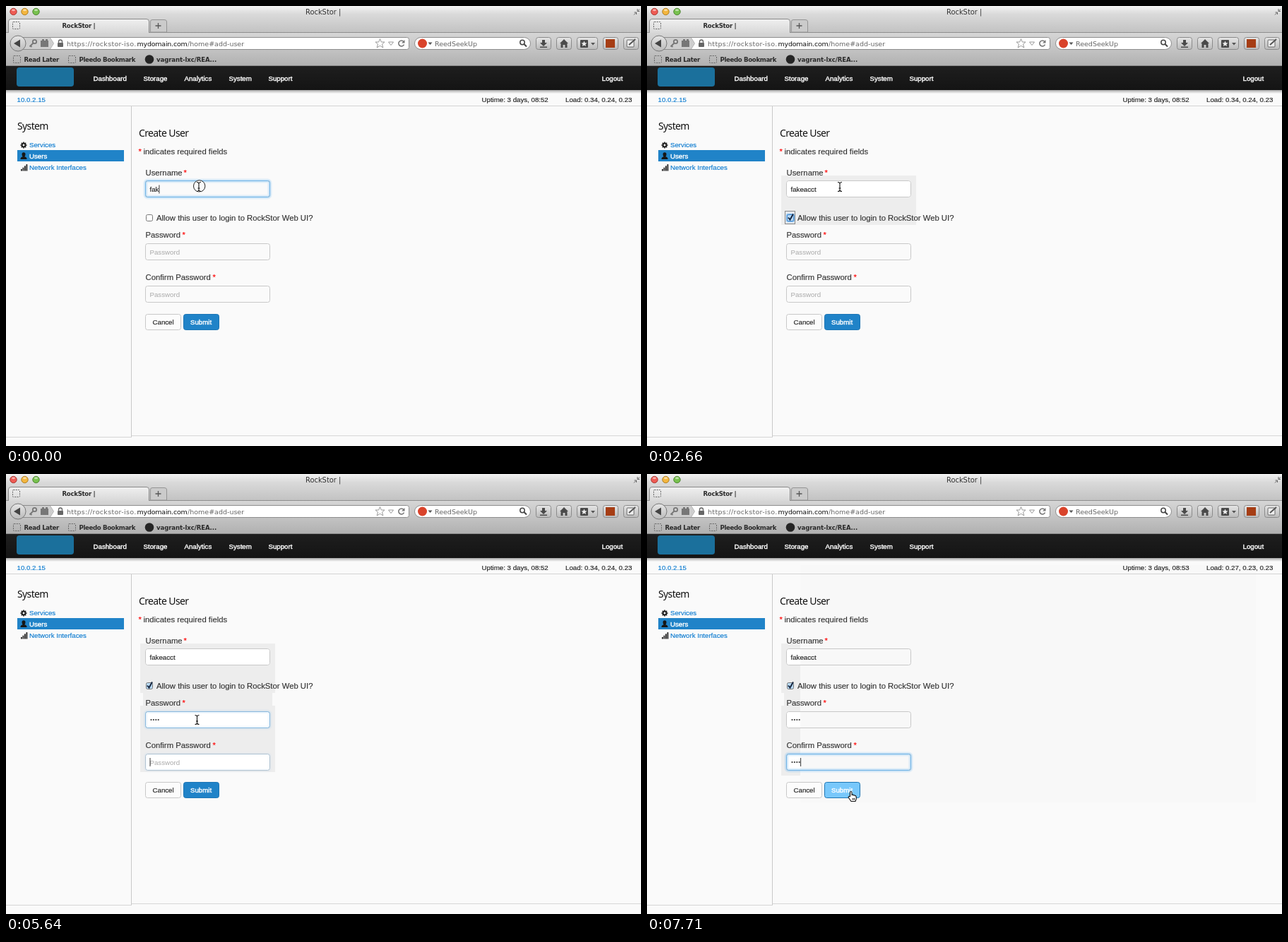
An HTML page for the animation above (8 s loop, 899 px wide and 623 px high).

```html
<!DOCTYPE html>
<html lang="en">
<head>
<meta charset="utf-8">
<title>Create User</title>
<style>
html, body { margin: 0; width: 100%; height: 100%; overflow: hidden; background: #fafafa; }
svg { display: block; width: 899px; height: 623px; }
text { white-space: pre; }
.page { font: 9.7px "Liberation Sans", Arial, sans-serif; fill: #222; stroke: #222; stroke-width: .15px; }
.label { font-size: 11.3px; fill: #333; stroke: #333; }
.head { font: 14px "Noto Sans", sans-serif; letter-spacing: -.63px; fill: #111; }
.strong { fill: #fff; stroke: #fff; stroke-width: .4px; }
.link { fill: #0b7bd0; stroke: #0b7bd0; }
.req { fill: #f00; stroke: #f00; }
.hint { fill: #a9a9a9; stroke: none; }
.ui { font: 9.5px "DejaVu Sans", sans-serif; fill: #333; }
.bold { font-size: 8.6px; font-weight: bold; fill: #2a2a2a; letter-spacing: -.34px; }
</style>
</head>
<body>
<svg viewBox="0 0 899 623" xmlns="http://www.w3.org/2000/svg">
  <defs>
    <linearGradient id="strip" x2="0" y2="1">
      <stop stop-color="#f2f2f2"/><stop offset=".3" stop-color="#dadada"/><stop offset="1" stop-color="#c2c2c2"/>
    </linearGradient>
    <linearGradient id="bar" x2="0" y2="1"><stop stop-color="#d6d6d6"/><stop offset="1" stop-color="#b0b0b0"/></linearGradient>
    <linearGradient id="tab" x2="0" y2="1"><stop stop-color="#f0f0f0"/><stop offset="1" stop-color="#d8d8d8"/></linearGradient>
    <linearGradient id="key" x2="0" y2="1"><stop stop-color="#e6e6e6"/><stop offset="1" stop-color="#bababa"/></linearGradient>
    <linearGradient id="nav" x2="0" y2="1"><stop stop-color="#1e1e1e"/><stop offset="1" stop-color="#141414"/></linearGradient>
    <linearGradient id="shade" x2="0" y2="1"><stop stop-color="#9a9a9a"/><stop offset="1" stop-color="#fafafa"/></linearGradient>
  </defs>
  <rect width="899" height="623" fill="#fafafa"/>
  <g id="chrome"></g>
  <g id="frame"></g>
  <g id="form"></g>
</svg>
<script>
const LOOP = 8000;
const NAME = 'fakeacct';
const $ = id => document.getElementById(id);

const rect = (x, y, w, h, fill, more = '') =>
  `<rect x="${x}" y="${y}" width="${w}" height="${h}" fill="${fill}" ${more}/>`;
const disc = (x, y, r, fill, more = '') => `<circle cx="${x}" cy="${y}" r="${r}" fill="${fill}" ${more}/>`;
const path = (d, fill = 'none', more = '') => `<path d="${d}" fill="${fill}" ${more}/>`;
const line = (d, color, width = 1) => path(d, 'none', `stroke="${color}" stroke-width="${width}"`);
const text = (x, y, str, cls = 'page', more = '') => `<text x="${x}" y="${y}" class="${cls}" ${more}>${str}</text>`;
const box = (x, y, w, h, fill, stroke, r = 3) =>
  rect(x + .5, y + .5, w - 1, h - 1, fill, `rx="${r}" stroke="${stroke}"`);
const dashed = (x, y) =>
  rect(x + .5, y + .5, 10, 10, 'none', 'rx="1" stroke="#666" stroke-dasharray="2 1.3"');

// Value of the last [time, value] step reached.
function at(t, steps) {
  let value = steps[0][1];
  for (const [time, v] of steps) if (t >= time) value = v;
  return value;
}

function chrome() {
  const lights = [['#ee5b54', '#a83a35'], ['#f3b63f', '#ad7d22'], ['#78c14f', '#4b8430']];
  const buttons = [[750, 22], [779, 22], [808, 30], [845, 22], [874, 22]];
  return [
    rect(0, 0, 899, 38, 'url(#strip)'),
    rect(0, 38, 899, 47, 'url(#bar)'),
    lights.map(([fill, edge], i) => disc(10.5 + 16 * i, 8, 4.7, fill, `stroke="${edge}"`) +
      `<ellipse cx="${10.5 + 16 * i}" cy="5.8" rx="2.5" ry="1.4" fill="#fff" opacity=".55"/>`).join(''),
    text(424, 11.5, 'RockStor |', 'ui', 'style="font-size:9.9px"'),
    line('M889 12.500L892 9.500M889.500 9H892.500V12M894 7.500L897 4.500M894 4V7.500H897', '#666'),
    line('M0 37.500H899', '#8e8e8e'),
    path('M3.500 38V22Q3.500 18.500 7 18.500H199Q202.500 18.500 202.500 22V38', 'url(#tab)', 'stroke="#8a8a8a"'),
    path('M204.500 37V22Q204.500 19.500 207 19.500H224Q227.500 19.500 227.500 22V37Z', '#cbcbcb', 'stroke="#949494"'),
    line('M211.500 28H219.500M215.500 24V32', '#555', 1.3),
    dashed(9, 22),
    text(79.5, 31, 'RockStor |', 'ui bold', 'style="letter-spacing:-.3px"'),

    box(18, 44, 553, 18, '#fff', '#8d8d8d', 3),
    path('M22 45H62L67 53L62 61H22Z', '#cecece'),
    line('M62.500 45L67.500 53L62.500 61', '#aaa'),
    disc(17, 53, 11, 'url(#key)', 'stroke="#777"'),
    path('M11 53L20 47.500V58.500Z', '#444'),
    disc(40.5, 50.5, 2.7, 'none', 'stroke="#777" stroke-width="1.8"'),
    line('M38.500 52.500L33.500 57.500M34.500 56L36.500 58', '#777', 1.8),
    path('M49 49H51V47H54V49H56V47H59V49H60V58H49Z', '#777'),
    rect(73, 52, 8, 6, '#666', 'rx="1"'),
    line('M74.500 52V50.500A2.500 2.500 0 0 1 79.500 50.500V52', '#666', 1.4),
    text(86, 56.5, 'https://rockstor-iso.', 'ui', 'style="letter-spacing:.32px;fill:#666"'),
    text(185.5, 56.5, 'mydomain.com', 'ui', 'style="letter-spacing:-.23px;fill:#111"'),
    text(257, 56.5, '/home#add-user', 'ui', 'style="fill:#666"'),
    path('M529.500 46.500L531.400 51H536L532.500 54L533.800 59L529.500 56.200L525.200 59L526.500 54L523 51H527.600Z', '#fff', 'stroke="#999"'),
    path('M541.500 51H548.500L545 55.500Z', '#fff', 'stroke="#999"'),
    line('M563 50.500A4 4 0 1 0 563.500 54.500', '#777', 1.6),
    path('M564.500 48V52.500H560Z', '#777'),

    box(578, 44, 165, 18, '#fff', '#8d8d8d', 9),
    disc(589.5, 53, 6.5, '#d9432b'),
    path('M597.500 51.500H603.500L600.500 55Z', '#555'),
    text(607, 56.5, 'ReedSeekUp', 'ui', 'style="fill:#666"'),
    disc(731, 51.5, 3.2, 'none', 'stroke="#444" stroke-width="1.5"'),
    line('M733.500 54L737 57.500', '#444', 1.9),

    buttons.map(([x, w]) => box(x, 44, w, 18, 'url(#key)', '#8a8a8a')).join(''),
    path('M759 48H763V52H766L761 57L756 52H759ZM756 57.500H766V59H756Z', '#4a4a4a'),
    path('M790 47L796 53H794.500V59H791.500V55H788.500V59H785.500V53H784Z', '#4a4a4a'),
    rect(813, 48, 11, 11, '#4a4a4a', 'rx="1"'),
    path('M818.500 49.500L819.700 52.300H822.500L820.300 54.200L821.100 57L818.500 55.400L815.900 57L816.700 54.200L814.500 52.300H817.300Z', '#eee'),
    path('M828 52H834L831 55.500Z', '#555'),
    rect(849, 47, 13, 12, '#a63d14'),
    rect(879, 48, 10, 10, '#eee', 'rx="1" stroke="#666"'),
    line('M882 55L891 47', '#555', 2),

    dashed(10, 70), dashed(88, 70),
    text(25.5, 78.5, 'Read Later', 'ui bold'),
    text(103.5, 78.5, 'Pleedo Bookmark', 'ui bold'),
    disc(203, 75.5, 6.3, '#252525'),
    text(213, 78.5, 'vagrant-lxc/REA...', 'ui bold', 'style="letter-spacing:-.12px"'),
    line('M0 84.500H899', '#8a8a8a'),
  ].join('');
}

function frame() {
  const menu = [[123.5, 'Dashboard'], [194.5, 'Storage'], [252.5, 'Analytics'], [315.5, 'System'], [371.5, 'Support'], [843.5, 'Logout']];
  const teeth = [...Array(8)].map((_, i) =>
    `<path d="M25 192.500V195" stroke="#222" stroke-width="1.700" transform="rotate(${45 * i} 25 197)"/>`).join('');
  return [
    rect(0, 118, 899, 6, 'url(#shade)'),
    rect(0, 85, 899, 34, 'url(#nav)'),
    rect(15, 87, 81, 27, '#1b709c', 'rx="4"'),
    menu.map(([x, s]) => text(x, 106, s, 'page strong')).join(''),
    line('M0 141.500H899', '#d3d3d3'),
    line('M177.500 142V610', '#c9c9c9'),
    line('M0 610.500H178M178 608.500H899', '#d6d6d6'),
    text(15.5, 136, '10.0.2.15', 'page link'),
    text(16, 175, 'System', 'head'),
    teeth, disc(25, 197, 2.4, 'none', 'stroke="#222" stroke-width="2"'),
    text(33, 200, 'Services', 'page link'),
    rect(16, 204, 151, 16, '#2083c8'),
    path('M22.500 210A2.500 2.700 0 0 1 27.500 210Q27.300 212.800 26.300 213.300Q29.500 214 29.500 217H20.500Q20.500 214 23.700 213.300Q22.700 212.800 22.500 210', '#161616'),
    text(33, 216, 'Users', 'page strong'),
    [0, 1, 2, 3].map(i => rect(21 + 2.5 * i, 231 - 2.3 * i, 1.8, 2.5 + 2.3 * i, '#222')).join(''),
    text(33, 232, 'Network Interfaces', 'page link'),
  ].join('');
}

// Input outline; focus runs from 0 to 1.
function field(y, focus) {
  const ring = (color, width, opacity) =>
    rect(197.5, y + .5, 176, 23, 'none', `rx="3" stroke="${color}" stroke-width="${width}" opacity="${opacity}"`);
  const edge = box(197, y, 177, 24, 'none', '#c8c8c8');
  if (!focus) return edge;
  return ring('#52a8ec', 6, .14 * focus) + ring('#52a8ec', 3.5, .16 * focus) +
    edge + ring('#74b5e6', 1, Math.min(1, focus * 1.8));
}

const caret = (x, y) => line(`M${x} ${y - 6}V${y + 6}`, '#222', .9);
const label = (y, str, starX) => text(197.5, y, str, 'page label') + text(starX, y, '*', 'page label req');
const dots = (n, y) => n
  ? [...Array(n)].map((_, i) => disc(205.5 + 3.4 * i, y, 1.1, '#333')).join('')
  : text(203.5, y + 4, 'Password', 'page hint');

function checkbox(focus, checked) {
  return [
    focus ? box(195, 290, 15, 19, '#e4e8ee', '#888', 0) + rect(197, 294, 12, 12, '#7fbcf0', 'rx="3"') : '',
    rect(198.5, 295.5, 9, 9, checked ? '#b9daf5' : '#fff', `rx="2" stroke="${focus ? '#4c86c6' : '#777'}"`),
    checked ? line('M200 299.500L202.500 302.500L207 294.500', '#14233c', 1.9) : '',
  ].join('');
}

const BEAM = 'M-3-6.500Q0-6.500 0-4.500Q0-6.500 3-6.500M-3 6.500Q0 6.500 0 4.500Q0 6.500 3 6.500M0-5V5M-1.500 2H1.500';
const shapes = {
  beam: () => line(BEAM, '#fff', 2.6) + line(BEAM, '#111', 1.1),
  press: () => disc(.7, -1, 8.2, '#fafafa', 'stroke="#222" stroke-width="1"') + shapes.beam(),
  arrow: () => path('M0 0V11L2.600 8.700L4.400 12.800L6.300 12L4.600 8H8Z', '#111', 'stroke="#fff" stroke-width=".8"'),
  hand: () => path('M-2.500 1V-5Q-2.500-6.500-1.300-6.500T0-5V-1.500Q1.500-2.500 2.500-1Q4-1.800 4.500-.300Q6.200-.600 6.200 1V4L5 7.500H-1L-4.800 2Q-5-.300-2.500 1M1.500 3V5.500M3.500 3V5.500', '#fff', 'stroke="#111" stroke-width="1.100" stroke-linejoin="round"'),
};

const pointer = [
  [0, ['press', 273, 256]], [140, ['beam', 273, 256]],
  [3410, ['beam', 273, 264]], [3560, ['beam', 272.5, 293]], [3710, ['beam', 272, 323]], [3860, ['beam', 270.5, 348]],
  [7120, ['arrow', 276, 377]], [7270, ['beam', 284, 408]], [7410, ['hand', 290, 456]],
];

// Areas repainted in a slightly darker tone: [from, x, y, w, h].
const patches = [
  [1320, 190, 240, 191, 70], [3710, 263, 310, 18, 26],
  [4150, 194, 310, 183, 18], [4150, 190, 328, 191, 39],
  [5640, 190, 367, 191, 55], [5790, 190, 422, 191, 5],
];

const typed = [[0, 3], [590, 4], [740, 5], [880, 6], [1030, 7], [1180, 8]];
const passDots = [[0, 0], [4750, 1], [4890, 2], [5040, 4]];
const confirmDots = [[0, 0], [6240, 1], [6390, 2], [6540, 3], [6680, 4]];
const userFocus = [[0, 1], [1320, 0]];
const passFocus = [[0, 0], [4150, .35], [4300, .6], [5640, .4], [5790, 0]];
const confirmFocus = [[0, 0], [5640, .15], [5790, .6], [7710, 1]];
const hover = [[0, '#2083c8'], [7410, '#4aa6e4'], [7560, '#78c8fb']];

const pen = document.createElement('canvas').getContext('2d');
pen.font = '9.7px "Liberation Sans", Arial, sans-serif';

function form(t) {
  const fresh = t >= 7710;
  const name = NAME.slice(0, at(t, typed));
  const nPass = at(t, passDots), nConfirm = at(t, confirmDots);
  const [shape, x, y] = at(t, pointer);
  const white = (from, top) => t >= from ? rect(197, top, 177, 24, '#fff', 'rx="3"') : '';
  const nameCaret = t < 140 || (t >= 590 && t < 1320);
  const passCaret = t >= 4300 && t < 5040;
  const confirmCaret = (t >= 5640 && t < 6680) || fresh;
  return [
    patches.map(([from, ...r]) => t >= from ? rect(...r, '#ededed') : '').join(''),
    white(1320, 247), white(4150, 336), white(5640, 396),
    fresh ? rect(217, 129, 645, 336, '#f8f8f8') + line('M217 141.500H862', '#d3d3d3') : '',

    text(673.5, 136, 'Uptime: 3 days, 08:5' + (fresh ? 3 : 2)),
    text(792, 136, 'Load: ' + (fresh ? '0.27, 0.23, 0.23' : '0.34, 0.24, 0.23')),
    text(188, 185, 'Create User', 'head'),
    text(187.5, 210, '*', 'page label req'),
    text(194.5, 210, 'indicates required fields', 'page label'),

    label(240, 'Username', 251.5),
    field(247, at(t, userFocus)),
    text(203.5, 263, name),
    nameCaret ? caret(204 + pen.measureText(name).width, 259.5) : '',

    checkbox(t >= 1320 && t < 4150, t >= 2660),
    text(213, 304, 'Allow this user to login to RockStor Web UI?', 'page label'),

    label(328, 'Password', 249.5),
    field(336, at(t, passFocus)),
    dots(nPass, 348),
    passCaret ? caret(204 + 3.4 * nPass, 348) : '',

    label(388, 'Confirm Password', 292.5),
    field(396, at(t, confirmFocus)),
    dots(nConfirm, 408),
    confirmCaret ? caret(204 + 3.4 * nConfirm, 408) : '',

    box(197, 436, 51, 23, '#fcfcfc', '#c8c8c8'),
    text(207.5, 451, 'Cancel'),
    box(251, 436, 51, 23, at(t, hover), '#1d76b5'),
    text(261, 451, 'Submit', 'page strong'),
    `<g transform="translate(${x} ${y})">${shapes[shape]()}</g>`,
  ].join('');
}

$('chrome').innerHTML = chrome();
$('frame').innerHTML = frame();

let shown = '';
function draw(now) {
  const next = form(now % LOOP);
  if (next !== shown) $('form').innerHTML = shown = next;
  requestAnimationFrame(draw);
}
draw(0);
</script>
</body>
</html>
```
